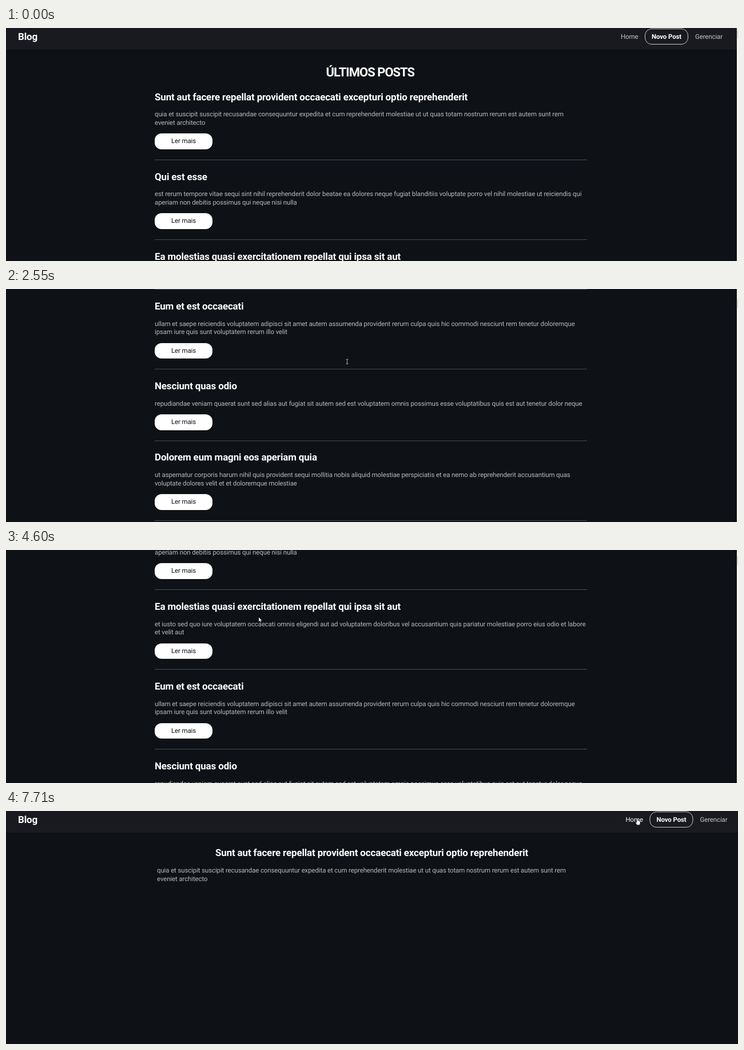
Recreate the animation shown at these times as an HTML page. Size 1280 px wide and 409 px high, loop 8000 ms.

```html
<!DOCTYPE html>
<html lang="pt-BR">
<head>
<meta charset="utf-8">
<title>Blog</title>
<style>
  html, body { margin: 0; width: 100%; height: 100%; overflow: hidden; background: #0e1116; }
  #stage {
    position: relative; width: 1280px; height: 409px; overflow: hidden;
    background: #0e1116; color: #fff;
    font: 11.5px/14.7px Roboto, sans-serif; letter-spacing: -.13px;
    text-rendering: geometricPrecision; white-space: pre;
  }
  #stage * { box-sizing: border-box; }
  #page, #list, #detail, header, nav, nav span, h1, .brand, .cursor, #bar, #thumb { position: absolute; }
  #page { left: 0; top: 0; width: 1280px; }
  header { left: 0; top: 0; width: 1280px; height: 38px; background: #191a1f; }
  h1, h2, .brand { margin: 0; font-weight: 700; }
  h2, .brand { font-size: 17px; line-height: 20px; letter-spacing: -.17px; }
  p { margin: 0; color: #b6b9be; }
  .brand { left: 21px; top: 6px; }
  nav { left: 1075px; top: 0; color: #c4c5c8; line-height: 28px; }
  nav span { top: 1px; }
  nav .new {
    left: 42px; width: 76px; height: 28px; line-height: 26px; text-align: center;
    color: #fff; font-weight: 700; border: 1px solid #c9cacc; border-radius: 12px;
  }
  nav .manage { left: 130px; }
  h1 { left: 559.5px; top: 66.6px; font-size: 22px; line-height: 24px; letter-spacing: -1px; }
  #list { left: 260px; top: 111.6px; width: 755.5px; }
  .post p { margin: 12.8px 0 11.6px; }
  .post b {
    display: block; width: 101px; height: 27.8px; line-height: 27.8px; margin-bottom: 18px;
    border-radius: 12px; background: #fff; color: #0e1116; font-weight: 400; text-align: center;
  }
  .post hr { height: 1px; margin: 0 0 19.47px; border: 0; background: #484b4f; }
  #detail { left: 264px; top: 64.4px; width: 756px; }
  #detail h2 { margin-left: 102px; }
  #detail p { margin-top: 12.8px; }
  #bar { left: 1278px; top: 0; width: 2px; height: 409px; background: #f8f8f8; }
  #thumb { left: 1px; top: 2px; width: 1px; height: 16px; background: #c1c1c1; }
  .cursor { left: 0; top: 0; overflow: visible; }
</style>
</head>
<body>
<div id="stage">
  <div id="page">
    <header>
      <div class="brand">Blog</div>
      <nav><span id="home">Home</span><span class="new">Novo Post</span><span class="manage">Gerenciar</span></nav>
    </header>
    <h1>ÚLTIMOS POSTS</h1>
    <div id="list"></div>
    <div id="detail"></div>
  </div>
  <div id="bar"><div id="thumb"></div></div>
  <svg class="cursor" id="arrow" width="8" height="12"><path d="M0 0V8L1.9 6.3L3.1 9L4.4 8.4L3.2 5.8H5.7Z" fill="#fff" stroke="#111" stroke-width=".4"/></svg>
  <svg class="cursor" id="beam" width="8" height="12"><path d="M-2-4H-.5L0-3.6L.5-4H2M0-3.6V3.6M-2 4H-.5L0 3.6L.5 4H2" fill="none" stroke="#c8c9cb" stroke-width=".9"/></svg>
  <svg class="cursor" id="hand" width="10" height="14"><path d="M-1 .7Q0-.5 1 .7V3.8L4.3 4.8Q5 5.2 5 6V8.5L4 11.5H-.8L-3 7.6Q-3.2 6.2-2 6.4L-1 7.4Z" fill="#fff" stroke="#111" stroke-width=".5"/></svg>
</div>
<script>
const posts = [
  ['Sunt aut facere repellat provident occaecati excepturi optio reprehenderit',
   'quia et suscipit suscipit recusandae consequuntur expedita et cum reprehenderit molestiae ut ut quas totam nostrum rerum est autem sunt rem\neveniet architecto'],
  ['Qui est esse',
   'est rerum tempore vitae sequi sint nihil reprehenderit dolor beatae ea dolores neque fugiat blanditiis voluptate porro vel nihil molestiae ut reiciendis qui\naperiam non debitis possimus qui neque nisi nulla'],
  ['Ea molestias quasi exercitationem repellat qui ipsa sit aut',
   'et iusto sed quo iure voluptatem occaecati omnis eligendi aut ad voluptatem doloribus vel accusantium quis pariatur molestiae porro eius odio et labore\net velit aut'],
  ['Eum et est occaecati',
   'ullam et saepe reiciendis voluptatem adipisci sit amet autem assumenda provident rerum culpa quis hic commodi nesciunt rem tenetur doloremque\nipsam iure quis sunt voluptatem rerum illo velit'],
  ['Nesciunt quas odio',
   'repudiandae veniam quaerat sunt sed alias aut fugiat sit autem sed est voluptatem omnis possimus esse voluptatibus quis est aut tenetur dolor neque'],
  ['Dolorem eum magni eos aperiam quia',
   'ut aspernatur corporis harum nihil quis provident sequi mollitia nobis aliquid molestiae perspiciatis et ea nemo ab reprehenderit accusantium quas\nvoluptate dolores velit et et doloremque molestiae'],
  ['Magnam facilis autem',
   'dolore placeat quibusdam ea quo vitae magni quis enim qui quis quo nemo aut saepe quidem repellat excepturi ut quia sunt ut sequi eos ea sed quas'],
  ['Dolorem dolore est ipsam',
   'dignissimos aperiam dolorem qui eum facilis quibusdam animi sint suscipit qui sint possimus cum quaerat magni maiores excepturi ipsam ut commodi\ndolor voluptatum modi aut vitae'],
  ['Nesciunt iure omnis dolorem tempora et accusantium',
   'consectetur animi nesciunt iure dolore enim quia ad veniam autem ut quam aut nobis et est aut quod aut provident voluptas autem voluptas'],
  ['Optio molestias id quia eum',
   'quo et expedita modi cum officia vel magni doloribus qui repudiandae vero nisi sit quos veniam quod sed accusamus veritatis error'],
  ['Et ea vero quia laudantium autem',
   'delectus reiciendis molestiae occaecati non minima eveniet qui voluptatibus accusamus in eum beatae sit vel qui neque voluptates ut commodi qui\nincidunt ut animi commodi'],
  ['In quibusdam tempore odit est dolorem',
   'itaque id aut magnam praesentium quia et ea odit et ea voluptas et sapiente quia nihil amet occaecati quia id voluptatem incidunt ea est distinctio odio']
];

const LOOP = 8000, STEP = 67.5, OPEN = 5670, LOADED = 6070;
const bursts = [0, 380, 860, 1470, 2280, 3090, 3910, 4050, 4860, 5670, 6530, 7440];

// time, scroll offset
const scrollKeys = [
  [1402, 0], [1470, 8], [1740, 115], [1875, 135], [2010, 165], [3090, 857], [3700, 1225],
  [3832, 1260], [4000, 1260], [4050, 1235], [4120, 1150], [4590, 302], [4790, 75], [4930, 0]
];
// time, x, y, shape
const cursorKeys = [
  [380, 1112, 335, 'arrow'], [515, 870, 235, 'arrow'], [650, 737, 183, 'arrow'],
  [860, 733, 176, 'arrow'], [1000, 718, 153, 'beam'], [1062, 715, 148, 'beam'],
  [1470, 713, 146, 'beam'], [1875, 696, 128, 'beam'], [3090, 517, 127, 'beam'],
  [3832, 487, 114, 'beam'], [3910, 482, 114, 'beam'], [4050, 480, 114, 'arrow'],
  [4590, 442, 118, 'arrow'], [4860, 425, 130, 'arrow'], [5390, 334, 196, 'hand'],
  [6529, 334, 196, 'hand'], [6530, 403, 181, 'arrow'], [6867, 780, 92, 'arrow'],
  [7270, 1113, 15, 'arrow'], [7440, 1110, 14, 'hand'], [7710, 1104, 13, 'hand']
];

const $ = id => document.getElementById(id);
const nav = document.querySelector('nav'), title = document.querySelector('h1');
const article = ([head, text], tail = '') => `<h2>${head}</h2><p>${text}</p>${tail}`;
$('list').innerHTML = posts.map(p => `<div class="post">${article(p, '<b>Ler mais</b><hr>')}</div>`).join('');
$('detail').innerHTML = article(posts[0]);

function sample(keys, t) {
  const i = keys.findLastIndex(k => k[0] <= t);
  if (i < 0) return keys[0];
  const a = keys[i], b = keys[i + 1];
  if (!b) return a;
  const u = (t - a[0]) / (b[0] - a[0]);
  return a.map((v, j) => typeof v === 'number' ? v + (b[j] - v) * u : v);
}

// The screen refreshes in steps counted from the start of each burst.
function snap(t) {
  const start = bursts.findLast(s => s <= t);
  return start + Math.floor((t - start) / STEP + .15) * STEP;
}

const show = (el, on) => { el.style.visibility = on ? 'visible' : 'hidden'; };

function draw(t) {
  const s = snap(t), open = t >= OPEN;
  const y = open ? 0 : Math.round(sample(scrollKeys, s)[1]);
  $('page').style.transform = `translateY(${-y}px)`;
  $('thumb').style.transform = `translateY(${y * .03}px)`;
  nav.style.transform = `translateX(${open ? 8.5 : 0}px)`;
  for (const el of [title, $('list'), $('bar')]) show(el, !open);
  show($('detail'), t >= LOADED);

  const h = Math.min(1, Math.max(0, (s - 7400) / 270));
  const mix = c => Math.round(c + (255 - c) * h);
  $('home').style.color = `rgb(${mix(196)},${mix(197)},${mix(200)})`;

  const [, cx, cy, shape] = sample(cursorKeys, s);
  for (const id of ['arrow', 'beam', 'hand']) {
    show($(id), t >= 380 && id === shape);
    $(id).style.transform = `translate(${cx}px,${cy}px)`;
  }
}

const begin = performance.now();
function tick() {
  draw((performance.now() - begin) % LOOP);
  requestAnimationFrame(tick);
}
tick();
</script>
</body>
</html>
```
